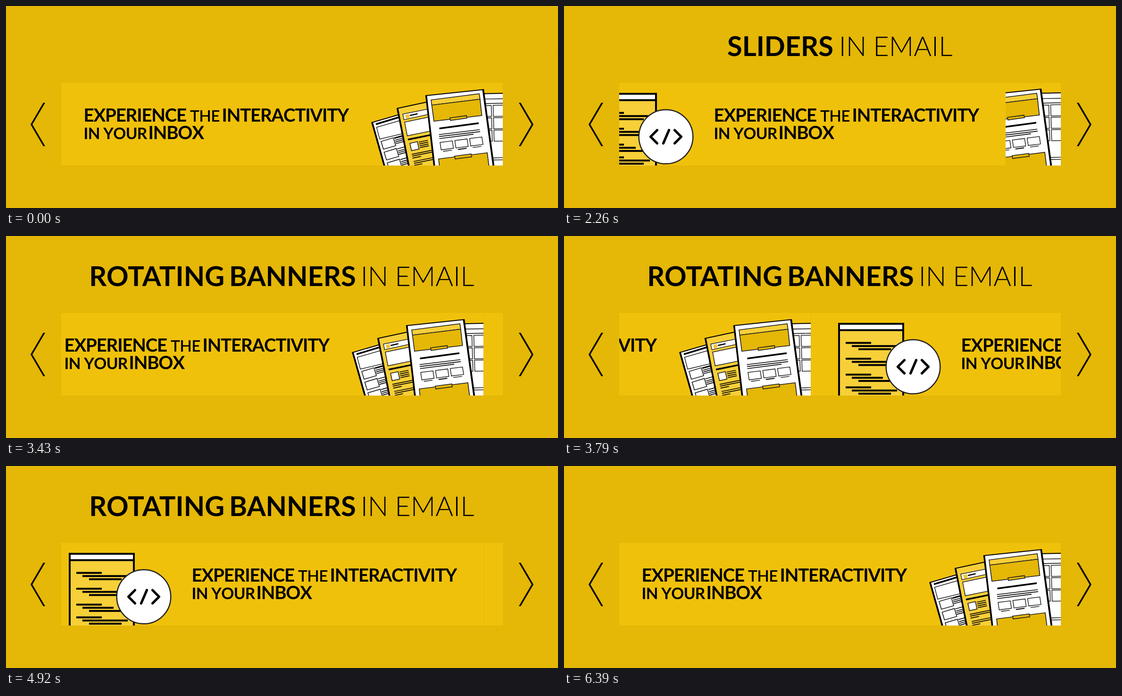
An HTML page that plays this animation: 1170 by 428 pixels, repeating every 6420 ms.

```html
<!DOCTYPE html>
<html lang="en">
<head>
<meta charset="utf-8">
<title>Sliders and rotating banners</title>
<style>
  html, body { margin: 0; width: 100%; height: 100%; overflow: hidden; background: #e5b706; }
  svg { display: block; width: 1170px; height: 428px; }
  text { font-family: Lato, sans-serif; text-rendering: geometricPrecision; }
  .bold { font-weight: 700; }
  .light { font-weight: 300; }
  .title { font-size: 57.8px; }
  .big, .small { font-weight: 700; font-kerning: none; }
  .big { font-size: 38.5px; letter-spacing: -1.2px; }
  .small { font-size: 33.5px; letter-spacing: -.7px; }
  .medium { font-weight: 600; }
</style>
</head>
<body>
<svg viewBox="0 0 1170 428" xmlns="http://www.w3.org/2000/svg">
  <defs>
    <clipPath id="panel"><rect x="117" y="163" width="936" height="175"/></clipPath>
  </defs>
  <rect width="1170" height="428" fill="#e5b706"/>
  <g id="sliders" class="title">
    <text class="bold" x="346" y="105.7">SLIDERS</text>
    <text class="light" x="582.7" y="105.7">IN</text>
    <text class="light" x="655.2" y="105.7">EMAIL</text>
  </g>
  <g id="banners" class="title">
    <text class="bold" x="176.3" y="105.7">ROTATING</text>
    <text class="bold" x="473" y="105.7">BANNERS</text>
    <text class="light" x="751.7" y="105.7">IN</text>
    <text class="light" x="824.2" y="105.7">EMAIL</text>
  </g>
  <path d="M79 205h4L56 251L83 297h-4L52 251zM1087 205h4L1118 251L1091 297h-4L1114 251z"/>
  <g id="stage" clip-path="url(#panel)">
    <g id="code"></g>
    <g id="pages"></g>
  </g>
</svg>
<script>
const el = id => document.getElementById(id);
const DARK = '#e5b706', PANEL = '#f0c10b', PALE = '#f7cf38', INK = '#222';

const shape = (d, fill, width = 1.7, ink = INK) =>
  `<path d="M${d}z" fill="${fill}" stroke="${ink}" stroke-width="${width}"/>`;
const fillOnly = (d, fill) => `<path d="M${d}z" fill="${fill}"/>`;
const line = (d, width = 1.7) => `<path d="M${d}" fill="none" stroke="#000" stroke-width="${width}"/>`;
const bar = (x, y, w) => `<rect x="${x}" y="${y}" width="${w}" height="4"/>`;

// Parallel text lines, each a little lower and further right.
const lines = (x, y, dx, dy, n, gap) =>
  Array.from({ length: n }, (_, i) => line(`${x + i * .8} ${y + i * gap}l${dx} ${dy}`)).join('');

const headline = x => `<g transform="translate(${x})">
  <text class="big" x="164.5" y="245">EXPERIENCE</text>
  <text class="small medium" x="390" y="245">THE</text>
  <text class="big" x="457.5" y="245">INTERACTIVITY</text>
  <text class="small" x="164.5" y="282">IN YOUR</text>
  <text class="big" x="301.5" y="282">INBOX</text></g>`;

function backPage() {
  let s = fillOnly('1010 186L1056 185V340H1028', '#fff');
  s += line('1010 186L1056 185', 2) + line('1012 197.2L1056 196.5', 1.4) + line('1014 206.8L1056 206', 1.4);
  for (let i = 0; i < 3; i++) {
    const y = 210 + i * 26.3, x = 1032.5 + i * .8;
    s += shape(`${x} ${y + .5}L1058 ${y}V${y + 23.5}L${x + .6} ${y + 24}`, '#fff', 1.5);
    s += shape(`1010 ${y + 1}L${x - 4} ${y + .7}L${x - 3.4} ${y + 24}H1010`, '#fff', 1.5);
  }
  return s + line('1026 322L1056 321.3', 1.4) + line('1026 326.5L1056 325.8', 1.4);
}

function leftPage() {
  let s = fillOnly('775 247L832 230L870 340H801', '#fff');
  s += line('775 247L832 230.5', 2) + line('775.8 246L802.4 340', 3.6) + line('784 250.5L832 236', 3.4);
  s += shape('785.5 257L836 242.5L843 270L792 282', '#fff', 1.5);
  for (let i = 0; i < 3; i++) {
    const x = 795 + i * 6.5, y = 287 + i * 22.7;
    s += shape(`${x} ${y}l26 -7.8l5 16.8l-26 7.5`, '#fff');
    s += line(`${x + 28} ${y - 7}l18 -5`, i ? 1.7 : 3) + lines(x + 29.5, y - 2.5, 18, -5, 3, 3.6);
  }
  return s;
}

function yellowPage() {
  let s = fillOnly('829 217L892 203L912 340H853', PALE);
  s += line('829 217L892 203.5', 2) + line('829.5 216L854 340', 3.6);
  s += shape('841 229L896 218L898 229L843.5 241', '#fff', 1.4);
  s += fillOnly('846 231L854 229L855.5 236.5L848 238.5', '#f3c32b') + line('856 232L872.5 228.3', 2.6);
  s += shape('845 246L898 235L902 264.5L850.5 275', '#fff', 1.5);
  s += line('852 283L902 272.8', 3.4);
  s += shape('856 291L872 287.5L875.5 303L859.5 306.5', '#fff');
  s += lines(875, 288.5, 19, -4, 4, 3.9);
  s += lines(860, 314.3, 42, -8.5, 2, 3.8) + line('861.7 322.3l18 -3.6');
  return s + lines(864, 329.5, 42, -8.5, 2, 3.8) + line('865.5 337.5l17 -3.4');
}

function frontPage() {
  let s = fillOnly('889 190L1012 177L1034 340H907', '#fff');
  s += line('889 190L1013 177', 2) + line('890.5 189.5L908 340', 3.6) + line('1011.3 177L1033.5 340', 3.8);
  s += shape('901 199L1003 186L1004.7 197.5L902.5 210', PALE);
  s += shape('902.5 210L1004.7 197.5L1008.5 232L907 244', DARK);
  s += shape('941 237L976 232.3L977 237.6L942 242.5', DARK);
  s += line('918.5 259.5L1002 248.3', 3.6);
  s += line('917.5 272.5L1004 262') + line('918 276.7L1005 266.2') + line('918.5 281L991 271.6');
  for (let i = 0; i < 3; i++) {
    const x = 920 + i * 31.3, y = 289 - i * 4.1;
    s += shape(`${x} ${y}l26 -3.2l2.4 15.8l-26 3.2`, '#fff', 1.5);
    s += line(`${x + 6.5} ${y + 19}l18.5 -2.4`, i == 1 ? 2 : 1.3);
  }
  s += shape('917 324L1020 311L1024 342H919', DARK);
  return s + shape('951 318L986 313.4L987 319.5L952 324', DARK);
}

function codePage() {
  let s = `<rect x="174" y="184" width="140" height="160"/>
    <rect x="178" y="188" width="132" height="9.5" fill="#fff"/>
    <rect x="178" y="201.5" width="132" height="140" fill="${PALE}"/>`;
  [224.5, 258, 291.7, 318.7].forEach((y, i) => {
    s += bar(190, y, 54) + bar(203, y + 6.7, i == 2 ? 66 : 96) + bar(217, y + 13.4, 69);
  });
  s += `<circle cx="333" cy="277" r="57.3" fill="#fff" stroke="${INK}" stroke-width="2.5"/>`;
  return s + `<path d="M314.5 263L300.5 277L314.5 291M339.5 263L327.5 291M351.5 263L365.5 277L351.5 291"
    fill="none" stroke="#000" stroke-width="5.2" stroke-linecap="round" stroke-linejoin="round"/>`;
}

const slide = body => `<g clip-path="url(#panel)">
  <rect x="117" y="163" width="936" height="175" fill="${PANEL}"/><g class="body">${body}</g></g>`;

const stage = el('stage'), pages = el('pages'), code = el('code');
pages.innerHTML = slide(headline(0) + backPage() + leftPage() + yellowPage() + frontPage());
code.innerHTML = slide(codePage() + headline(270));
const pageBody = pages.querySelector('.body');

const LOOP = 6420, TICK = 30, WIDTH = 936;
const move = (node, x, y = 0) => node.setAttribute('transform', `translate(${x} ${y})`);

// Share of a linear move done, in n hard steps; the first step falls on start.
const steps = (t, start, n) =>
  Math.max(0, Math.min(n, Math.floor((t - start) / TICK + 1e-6) + 1)) / n;

function carousel(t, start, out, next) {
  const s = WIDTH * steps(t, start, 23);
  move(out, Math.floor(-s));
  move(next, Math.ceil(WIDTH - s));
}

function draw(t) {
  move(el('sliders'), Math.round(822 * (1 - steps(t, 80, 9)) - 826 * steps(t, 2520, 8)));
  move(el('banners'), Math.round(990 * (1 - steps(t, 2730, 9)) - 996 * steps(t, 6180, 8)));

  const codeOnTop = t >= 2260 && t < 3430;
  const top = codeOnTop ? code : pages;
  if (stage.lastElementChild !== top) stage.appendChild(top);
  move(pageBody, codeOnTop ? -1 : 0, codeOnTop ? -1 : 0);

  if (t < 2260) {
    move(pages, -1017 * steps(t, 1220, 9));
    move(code, 0);
  } else if (t < 3430) {
    move(pages, 0);
    move(code, -WIDTH * steps(t, 2260, 8));
  } else if (t < 4920) {
    carousel(t, 3430, pages, code);
  } else {
    carousel(t, 4920, code, pages);
  }
}

const begin = performance.now();
function tick() {
  draw((performance.now() - begin) % LOOP);
  requestAnimationFrame(tick);
}
draw(0);
requestAnimationFrame(tick);
</script>
</body>
</html>
```
